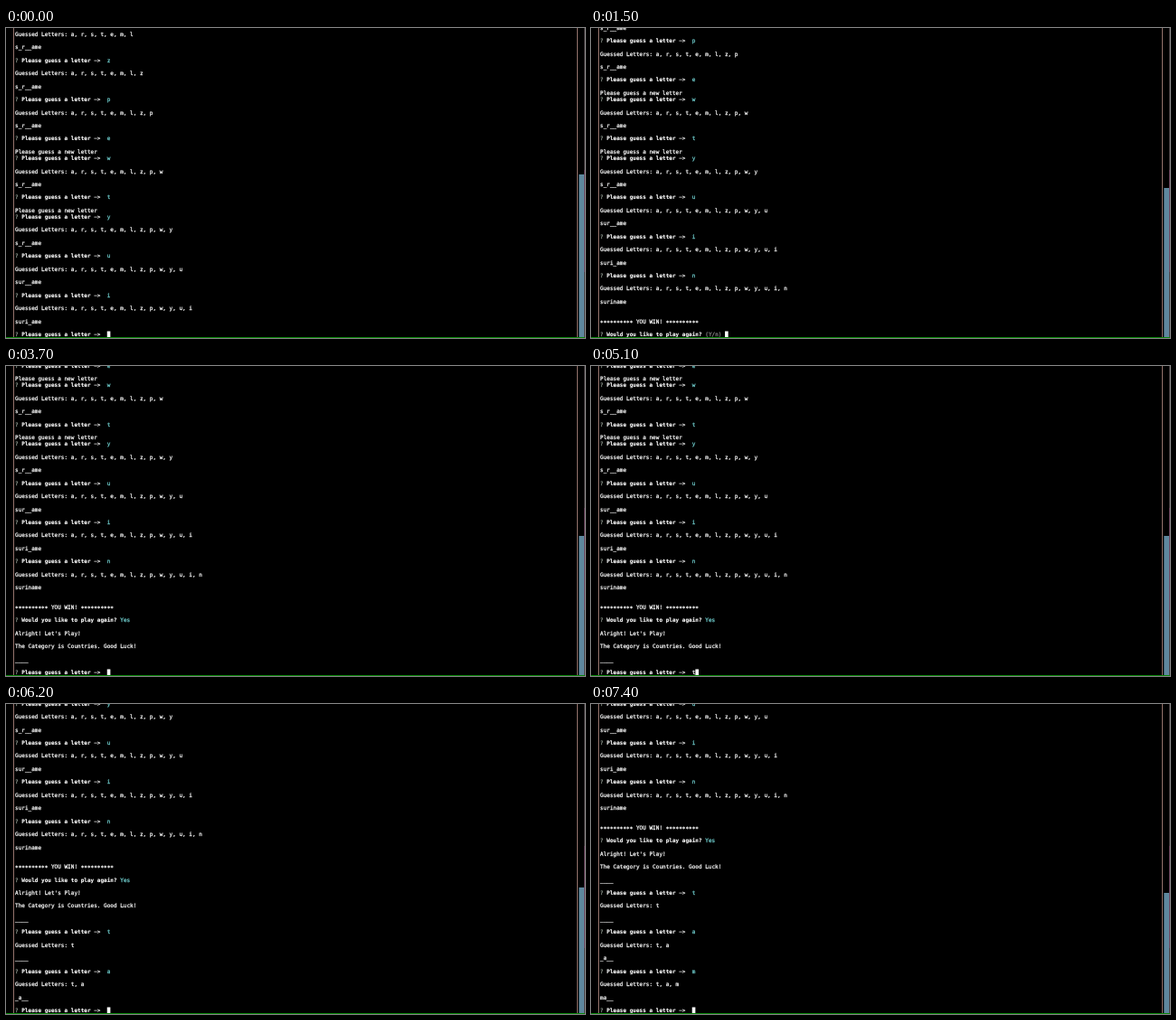
These frames come from a looping animation (640x343 px, 8000 ms). An HTML page with a canvas:

```html
<!DOCTYPE html>
<html lang="en">
<head>
<meta charset="utf-8">
<title>Word guessing game</title>
<style>
html, body { margin: 0; width: 100%; height: 100%; overflow: hidden; background: #000; }
canvas { display: block; }
</style>
</head>
<body>
<canvas id="stage" width="640" height="343"></canvas>
<script>
const ctx = document.getElementById('stage').getContext('2d');
const LOOP = 8000, LEFT = 10.1, CELL = 3.63, ROW = 7.22, LAST_BASELINE = 341;
const WHITE = '#f2f2f2', CYAN = '#6cc8c8', MARK = '#8a938a', GREY = '#808080';
const GUESS = 'Please guess a letter −>', AGAIN = 'Would you like to play again?';

// Terminal log: plain strings, or prompts with their answer
const log = [];
const say = (...lines) => lines.forEach(line => log.push(line, ''));
const ask = (message, answer, col, hint = '') => log.push({ message, answer, col, hint }, '');

function status(word, guessed) {
  say('Guessed Letters: ' + [...guessed].join(', '),
      [...word].map(c => guessed.includes(c) ? c : '_').join(''));
}

function play(word, guessed, letters) {
  for (const letter of letters) {
    ask(GUESS, letter, 28);
    if (guessed.includes(letter)) {
      log.push('Please guess a new letter');
    } else {
      guessed += letter;
      status(word, guessed);
    }
  }
}

const stars = '∗'.repeat(10);
status('suriname', 'arsteml');
play('suriname', 'arsteml', 'zpewtyuin');
log.push('');
say(`${stars} YOU WIN! ${stars}`);
ask(AGAIN, 'Yes', 32, '(Y/n)');
say("Alright! Let's Play!", 'The Category is Countries. Good Luck!', '____');
play('mali', '', 'tam');
ask(GUESS, '', 28);

// Start time, bottom row, scrollbar top, typed text
const steps = [
  [0, 46, 162, ''], [1000, 46, 162, 'n'],
  [1100, 55, 177, ''], [3600, 55, 177, 'y'],
  [3700, 63, 188, ''], [5100, 63, 188, 't'],
  [5200, 69, 195, ''], [6100, 69, 195, 'a'],
  [6200, 75, 203, ''], [7200, 75, 203, 'm'],
  [7300, 81, 209, '']
];

function box(color, x, y, w, h) {
  ctx.fillStyle = color;
  ctx.fillRect(x, y, w, h);
}

// Type is set at double size and halved so that advances stay fractional;
// a thin outline gives regular text its sturdy look
function put(text, col, y, color = WHITE, weight = 'normal') {
  ctx.save();
  ctx.translate(LEFT + col * CELL, y);
  ctx.scale(0.5, 0.5);
  ctx.font = weight + ' 12.06px "DejaVu Sans Mono", monospace';
  ctx.textRendering = 'geometricPrecision';
  ctx.fillStyle = ctx.strokeStyle = color;
  ctx.lineWidth = weight === 'bold' ? 0.2 : 0.55;
  ctx.lineJoin = 'round';
  ctx.fillText(text, 0, 0);
  ctx.strokeText(text, 0, 0);
  ctx.restore();
}

function drawPrompt(p, y, active, typed) {
  put('?', 0, y, MARK);
  put(p.message, 2, y, '#fff', 'bold');
  if (!active) {
    put(p.answer, p.col, y, CYAN);
    return;
  }
  put(p.hint, p.col, y, GREY);
  const col = p.col + (p.hint ? p.hint.length + 1 : 0);
  put(typed, col, y);
  box('#fff', LEFT + (col + typed.length) * CELL, y - 5.5, CELL, 6.5);
}

function draw(now) {
  const t = now % LOOP;
  const [, bottom, barTop, typed] = steps.findLast(s => s[0] <= t) || steps[0];
  box('#000', 0, 0, 640, 343);
  for (let i = Math.max(0, bottom - 47); i <= bottom; i++) {
    const y = LAST_BASELINE - (bottom - i) * ROW, line = log[i];
    if (typeof line === 'string') put(line, 0, y);
    else drawPrompt(line, y, i === bottom, typed);
  }
  box('#94736c', 8, 0, 1, 342);
  box('#94736c', 631, 0, 1, 342);
  box('#4c4446', 639, 0, 1, 342);
  box('#6e4860', 639, 157, 1, 113);
  box('#5f889e', 633.3, barTop, 5.7, 342 - barTop);
  box('#0a860a', 0, 342, 640, 1);
  requestAnimationFrame(draw);
}
requestAnimationFrame(draw);
</script>
</body>
</html>
```
